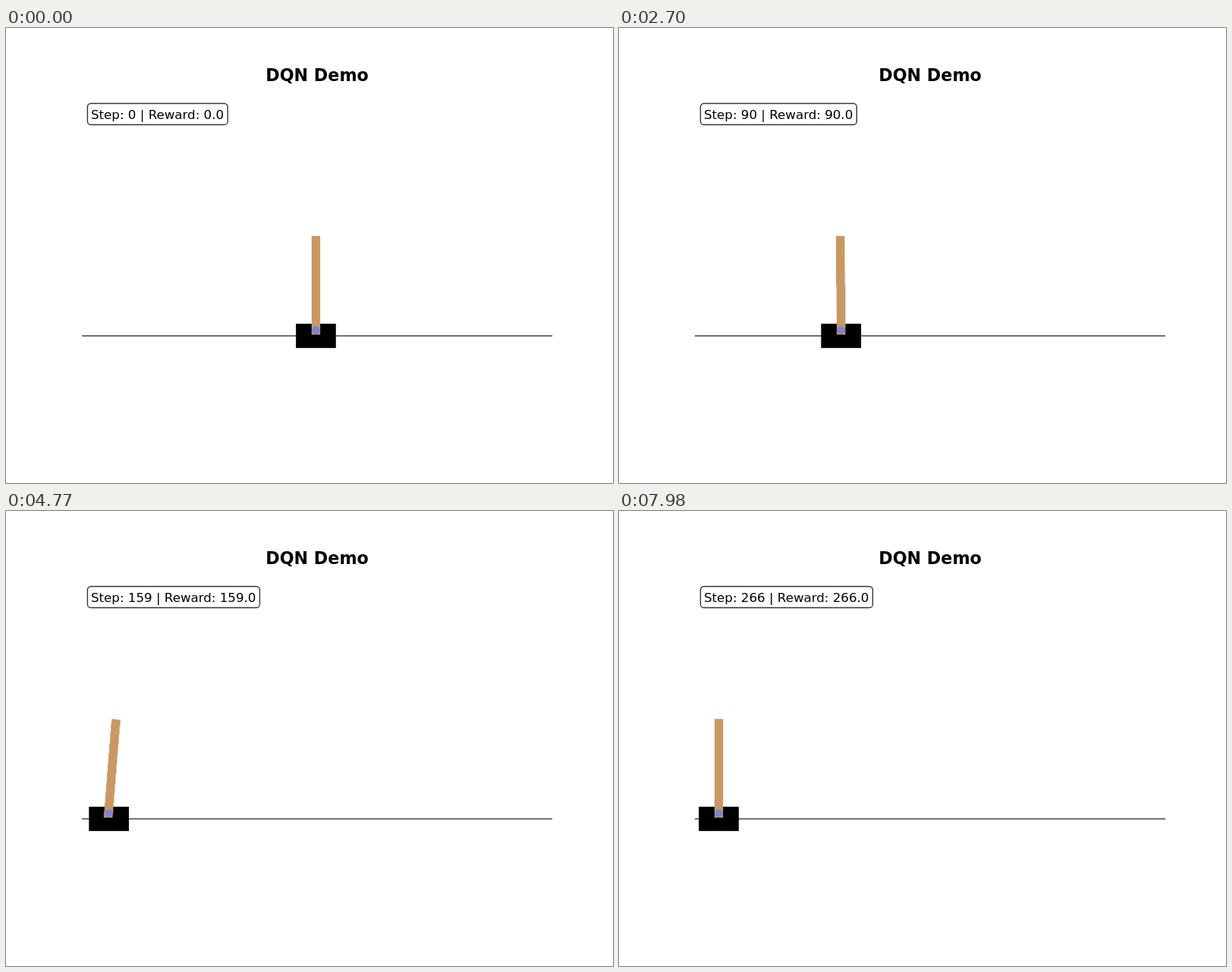
Animation, 800 px wide and 600 px high, one loop 8 s. Source, as an HTML page with a canvas:

```html
<!DOCTYPE html>
<html lang="en">
<head>
<meta charset="utf-8">
<title>Cart and pole</title>
<style>
  html, body { margin: 0; width: 100%; height: 100%; overflow: hidden; background: #fff; }
  canvas, svg { position: absolute; left: 0; top: 0; width: 800px; height: 600px; }
  text { font-family: "DejaVu Sans", sans-serif; font-size: 16.667px; white-space: pre; }
  .title { font-size: 22.222px; font-weight: bold; text-anchor: middle; }
</style>
</head>
<body>
<canvas id="stage" width="800" height="600"></canvas>
<svg viewBox="0 0 800 600">
  <text class="title" x="410" y="70">DQN Demo</text>
  <rect id="frame" x="107.4" y="99.5" height="28" rx="4.6"
        fill="#fff" fill-opacity=".8" stroke="#000" stroke-opacity=".8" stroke-width="1.39"/>
  <text id="label" x="112" y="120"></text>
</svg>
<script>
const LOOP = 8000, STEP = 30;
const TAN = 'rgb(202,152,101)', AXLE = 'rgb(129,132,203)';

// Key points of the cart's path: step, centre
const PATH = [
  [0, 298.7], [12, 300.2], [27, 295.6], [58, 270.2], [81, 209.5],
  [90, 186.5], [135, 65.3], [159, 34.2], [190, 22.6], [205, 24.6], [266, 30.5]
];

const stage = document.getElementById('stage').getContext('2d');
const frame = document.getElementById('frame');
const label = document.getElementById('label');
const world = document.createElement('canvas');
world.width = 600;
world.height = 400;
const g = world.getContext('2d');

function slope(i) {
  const [n0, x0] = PATH[i], [n1, x1] = PATH[i + 1];
  return (x1 - x0) / (n1 - n0);
}

function speed(i) {
  if (i === 0) return slope(0);
  if (i === PATH.length - 1) return slope(i - 1);
  const before = PATH[i][0] - PATH[i - 1][0];
  const after = PATH[i + 1][0] - PATH[i][0];
  return (slope(i - 1) * after + slope(i) * before) / (before + after);
}

// Smooth curve through the key points
function cartAt(n) {
  let i = 0;
  while (i < PATH.length - 2 && n >= PATH[i + 1][0]) i++;
  const [n0, x0] = PATH[i], [n1, x1] = PATH[i + 1];
  const u = (n - n0) / (n1 - n0), w = 1 - u;
  return w * w * (1 + 2 * u) * x0 + u * u * (3 - 2 * u) * x1
    + (n1 - n0) * u * w * (w * speed(i) - u * speed(i + 1));
}

// The pole leans left while the cart speeds up, then right while it brakes.
const bell = (n, centre, width) => Math.exp(-(((n - centre) / width) ** 2));
const leanAt = n => .1045 * bell(n, 138, 38) - .119 * bell(n, 54, 30.7);

// Corners snap to whole pixels; rows are stepped over a smooth outline.
function drawPole(cx, lean) {
  const sin = Math.sin(lean), cos = Math.cos(lean);
  const corner = (x, y) => [
    Math.trunc(cx + x * cos + y * sin),
    399 - Math.trunc(107.5 - x * sin + y * cos)
  ];
  const corners = [corner(-5, -5), corner(-5, 120), corner(5, 120), corner(5, -5)];
  const [base, top, topRight, baseRight] = corners;
  g.fillStyle = g.strokeStyle = TAN;
  g.beginPath();
  corners.forEach(([x, y]) => g.lineTo(x + .5, y + .5));
  g.closePath();
  g.fill();
  g.stroke();
  const last = Math.min(base[1], baseRight[1]);
  for (let y = Math.max(top[1], topRight[1]); y <= last; y++) {
    const u = (y - top[1]) / (base[1] - top[1]);
    g.fillRect(Math.round(top[0] + (base[0] - top[0]) * u), y, 11, 1);
  }
}

function drawWorld(cx, lean) {
  g.fillStyle = '#fff';
  g.fillRect(0, 0, 600, 400);
  g.fillStyle = '#000';
  const left = Math.trunc(cx - 25), right = Math.trunc(cx + 25);
  g.fillRect(left, 284, right - left + 1, 31);
  drawPole(cx, lean);
  g.fillStyle = AXLE;
  g.beginPath();
  g.arc(Math.trunc(cx) + .5, 292.5, 5.4, 0, 2 * Math.PI);
  g.fill();
  g.fillStyle = '#000';
  g.fillRect(0, 299, 600, 1);
}

let shown = -1;
function render(time) {
  const n = Math.floor((time % LOOP) / STEP);
  if (n === shown) return;
  shown = n;
  drawWorld(cartAt(n), leanAt(n));
  stage.fillStyle = '#fff';
  stage.fillRect(0, 0, 800, 600);
  stage.imageSmoothingQuality = 'high';
  stage.drawImage(world, 100, 96.5, 620, 400 * 620 / 600);
  label.textContent = `Step: ${n} | Reward: ${n}.0`;
  frame.setAttribute('width', 184.8 + 21.1 * (String(n).length - 1));
}

const start = performance.now();
function tick() {
  render(performance.now() - start);
  requestAnimationFrame(tick);
}
tick();
</script>
</body>
</html>
```
